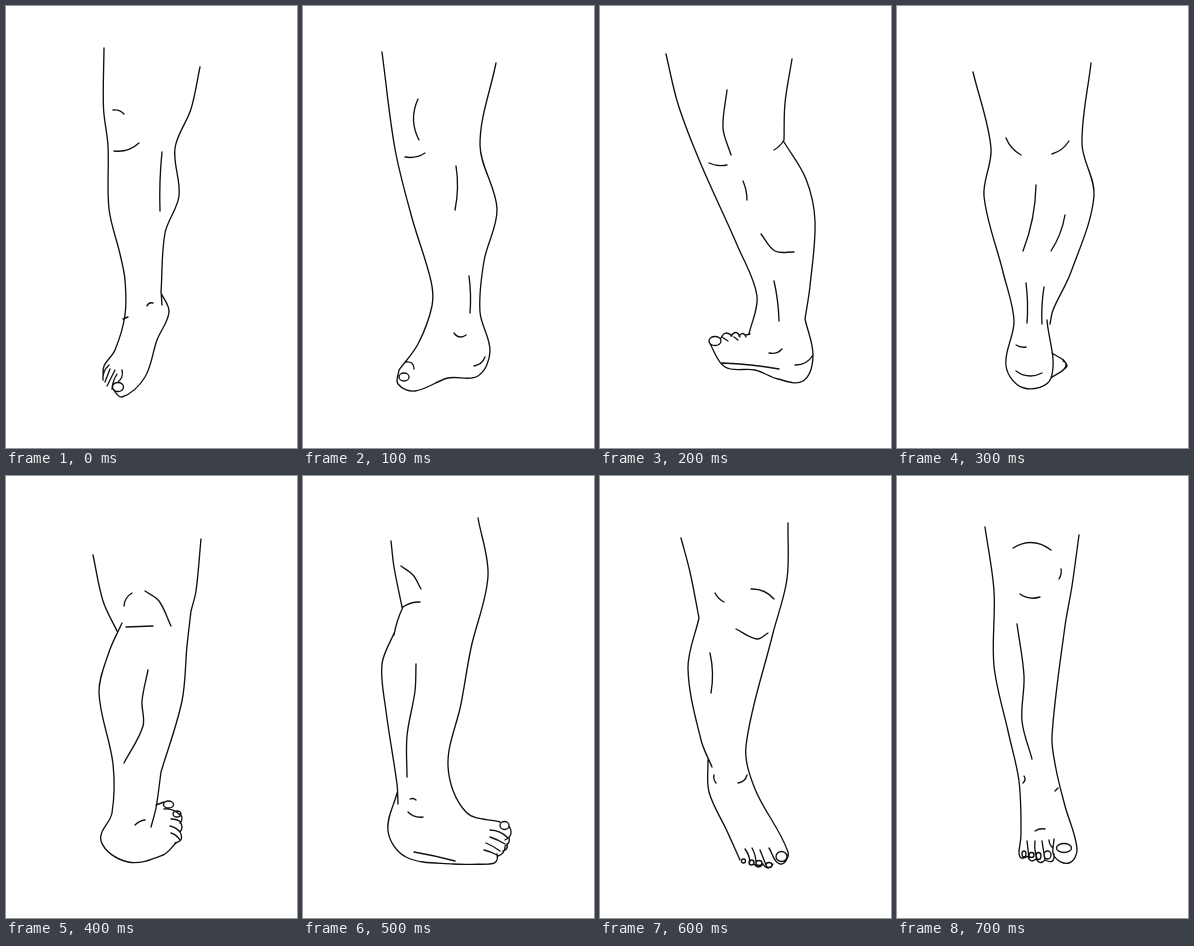
Animation of 291x442 px, one loop 0.8 s. Source, as an HTML page:

```html
<!DOCTYPE html>
<html lang="en">
<head>
<meta charset="utf-8">
<title>Turning leg</title>
<style>
  html, body { margin: 0; width: 100%; height: 100%; overflow: hidden; background: #fff; }
  svg { display: block; width: 100%; height: 100%; }
  path { fill: none; stroke: #111; stroke-width: 1.35; stroke-linecap: round; stroke-linejoin: round; }
</style>
</head>
<body>
<svg viewBox="0 0 291 442"><path id="leg"/></svg>
<script>
const STEP = 100;
let d = "";

// Smooth curve through points
function line(...xy) {
  const n = xy.length / 2;
  const at = i => { i = Math.max(0, Math.min(n - 1, i)); return [xy[2 * i], xy[2 * i + 1]]; };
  const gap = (a, b) => Math.hypot(b[0] - a[0], b[1] - a[1]);
  const handle = (i, reach) => {
    const a = at(i - 1), b = at(i + 1), k = reach / gap(a, b) / 3;
    return at(i).map((v, j) => v + (b[j] - a[j]) * k);
  };
  d += "M" + at(0);
  for (let i = 1; i < n; i++) {
    const len = gap(at(i - 1), at(i));
    d += `C${handle(i - 1, len)} ${handle(i, -len)} ${at(i)}`;
  }
}

// Arc between two points, bulging by b to the left of its direction
function bow(x1, y1, x2, y2, b = 0) {
  const dx = x2 - x1, dy = y2 - y1, k = 2 * b / Math.hypot(dx, dy);
  d += `M${x1},${y1}Q${(x1 + x2) / 2 + dy * k},${(y1 + y2) / 2 - dx * k} ${x2},${y2}`;
}

function oval(x, y, rx, ry) {
  d += `M${x - rx},${y}a${rx},${ry} 0 1 0 ${2 * rx},0a${rx},${ry} 0 1 0 ${-2 * rx},0`;
}

function frontLeft() {
  line(98, 42, 97.5, 102, 102, 140, 103, 203, 114, 248, 119, 274, 119, 309, 109, 344, 98, 360, 97, 371);
  line(194, 61, 185, 103, 169, 142, 173, 190, 159, 227, 155, 287);
  line(155, 287, 163, 306, 151, 334, 139, 371, 116, 391, 106, 382);
  bow(155, 285, 156, 299);
  bow(117, 313, 122, 311);
  bow(107, 104, 118, 108, 1.5);
  bow(108, 145, 133, 137, -3);
  bow(156, 146, 154, 205, -1);
  bow(141, 300, 147, 297, 1.5);
  oval(112, 381, 5.5, 4.5);
  bow(116, 364, 112, 376, 2);
  bow(103, 359, 97, 374, -2);
  bow(104, 363, 99, 376);
  bow(109, 364, 101, 380);
  bow(111, 368, 106, 383, -1);
}

function innerSide() {
  line(79, 46, 92, 143, 109, 212, 128, 275, 129, 300, 115, 338, 96, 364);
  line(193, 57, 177, 139, 194, 203, 181, 255, 177, 306, 187, 345, 175, 370, 145, 372, 112, 385, 95, 378, 96, 364);
  bow(115, 93, 116, 134, -5);
  bow(102, 151, 122, 147, -2);
  bow(153, 160, 152, 204, 2);
  bow(166, 270, 167, 307, 1);
  bow(151, 327, 163, 329, -3);
  oval(101, 371, 5, 4);
  bow(103, 356, 111, 363, 3);
  bow(171, 360, 182, 351, -2);
}

function innerBack() {
  line(66, 48, 78, 98, 100, 156, 138, 241, 157, 290, 149, 328);
  line(192, 53, 185, 97, 184, 134);
  bow(174, 144, 184, 134, -1);
  line(184, 136, 206, 173, 215, 215, 210, 280, 205, 313);
  line(205, 313, 213, 350, 203, 375, 178, 373, 155, 364, 125, 361, 109, 336);
  bow(122, 357, 179, 363, 1);
  bow(195, 359, 213, 349, -3);
  line(127, 84, 123, 122, 131, 149);
  bow(109, 157, 127, 159, -1.5);
  bow(143, 175, 147, 194, 1);
  line(161, 228, 175, 245, 194, 246);
  bow(174, 275, 179, 315, 1);
  bow(169, 347, 182, 343, -2);
  oval(115, 335, 6, 4.5);
  bow(121, 332, 132, 330, 4);
  bow(122, 331, 128, 335);
  bow(131, 330, 140, 331, 4);
  bow(134, 331, 138, 334);
  bow(139, 330, 146, 331, 3);
  bow(146, 329, 150, 328);
}

function back() {
  line(76, 66, 94, 142, 87, 190, 106, 266, 117, 315, 109, 360, 127, 382, 154, 372, 150, 314);
  line(194, 57, 185, 138, 197, 190, 174, 266, 156, 304, 153, 318);
  bow(109, 132, 124, 149, -2);
  bow(155, 148, 172, 135, -2);
  bow(139, 179, 126, 245, 3);
  bow(168, 209, 154, 245, 2);
  bow(129, 277, 130, 317, 1);
  bow(147, 281, 145, 318, -1);
  bow(119, 339, 129, 341, -1);
  bow(119, 365, 145, 367, -4);
  line(155, 347, 169, 359, 154, 372);
  bow(166, 355, 166, 364, 4);
}

function outerBack() {
  line(87, 79, 97, 125, 111, 155);
  line(116, 147, 103, 176, 93, 217, 107, 288, 106, 337, 95, 365, 122, 386, 157, 379, 170, 367);
  line(195, 63, 190, 115, 185, 135);
  line(185, 135, 181, 170, 176, 225, 155, 296);
  line(155, 296, 150, 332, 145, 351);
  bow(118, 130, 126, 117, 2);
  line(139, 115, 153, 125, 165, 150);
  bow(120, 151, 147, 150);
  line(142, 194, 136, 225, 137, 250, 118, 287);
  bow(129, 349, 139, 344, 1);
  bow(150, 329, 158, 326);
  oval(162.5, 328.5, 5, 3.5);
  oval(171, 338, 4, 3);
  bow(158, 333, 174, 339, 2);
  bow(174, 338, 174, 347, 2);
  bow(174, 346, 174, 356, 2);
  bow(174, 356, 169, 367, 4);
  bow(165, 343, 175, 346, 1);
  bow(164, 350, 174, 356, 1);
  bow(165, 357, 174, 364, 1);
}

function outerSide() {
  line(88, 65, 91, 91, 99, 131);
  bow(100, 131, 117, 126, 1.5);
  bow(100, 131, 91, 159, -1);
  line(92, 155, 79, 188, 83, 235, 94, 308, 95, 328);
  line(94, 317, 85, 355, 103, 381, 150, 388, 187, 388);
  line(175, 42, 185, 100, 168, 172, 158, 228, 145, 290, 163, 336, 197, 346);
  line(98, 90, 110, 99, 118, 113);
  line(113, 188, 112, 215, 104, 260, 104, 301);
  bow(107, 323, 113, 324, 1);
  bow(105, 336, 120, 341, -2);
  bow(111, 376, 152, 385, 0.5);
  oval(201.5, 349.5, 4.5, 4);
  bow(206, 350, 202, 364, 4);
  bow(187, 354, 205, 362, 2);
  bow(206, 361, 202, 370, 2);
  bow(187, 361, 202, 368, 0.5);
  bow(204, 368, 200, 375, 2);
  bow(183, 367, 197, 375, 0.5);
  bow(202, 371, 195, 380, 2);
  bow(181, 374, 194, 379, 0.5);
  bow(194, 378, 186, 388, 4);
}

function frontRight() {
  line(81, 62, 90, 96, 99, 142);
  line(99, 142, 88, 192, 101, 264, 112, 291);
  line(108, 284, 109, 316, 127, 355, 140, 384);
  line(188, 47, 187, 103, 173, 157);
  line(173, 157, 146, 270, 155, 313, 188, 376, 180, 388, 169, 372);
  bow(115, 117, 124, 126, -1);
  bow(151, 113, 174, 123, 3);
  line(136, 153, 157, 163, 168, 157);
  bow(110, 177, 111, 217, 2);
  bow(114, 299, 116, 307, -1);
  bow(138, 307, 147, 299, -2);
  oval(181.5, 380.5, 5.5, 5);
  oval(169, 389, 3, 2.5);
  oval(159, 387, 3, 2.5);
  oval(151.5, 386.5, 2.5, 2.5);
  oval(143.5, 385, 2, 2);
  bow(160, 374, 166, 389);
  bow(152, 372, 156, 387, 1);
  bow(145, 373, 150, 386, 1);
  bow(163, 388, 173, 388, -4);
  bow(154, 388, 163, 388, -3);
}

function front() {
  line(88, 51, 97, 115, 97, 190, 111, 255, 122, 305, 124, 358, 122, 375);
  line(182, 59, 175, 110, 168, 150, 155, 260, 159, 293, 168, 330, 180, 373, 172, 387, 157, 380, 157, 363);
  bow(116, 72, 154, 74, 6.5);
  bow(164, 93, 162, 103, 1);
  bow(123, 118, 143, 121, -2.5);
  line(120, 148, 127, 200, 125, 245, 135, 283);
  bow(127, 300, 126, 307, 1.5);
  bow(158, 315, 161, 312);
  bow(138, 355, 148, 353, 1);
  oval(167, 372, 7.5, 4.5);
  oval(127, 378, 2, 3);
  oval(134.5, 379, 2.5, 2.5);
  oval(141.5, 380, 2.5, 3.5);
  oval(150.5, 379, 3.5, 4);
  bow(122, 375, 131, 380, -5);
  bow(130, 365, 132, 382);
  bow(131, 381, 139, 383, -3);
  bow(138, 365, 140, 383, -1);
  bow(139, 383, 148, 384, -3);
  bow(145, 365, 148, 384);
  bow(148, 384, 157, 378, -5);
  bow(152, 364, 156, 372, -1);
}

const views = [frontLeft, innerSide, innerBack, back, outerBack, outerSide, frontRight, front];
const paths = views.map(view => { d = ""; view(); return d; });
const leg = document.getElementById("leg");

function draw() {
  leg.setAttribute("d", paths[Math.floor(performance.now() / STEP) % paths.length]);
  requestAnimationFrame(draw);
}
draw();
</script>
</body>
</html>
```
